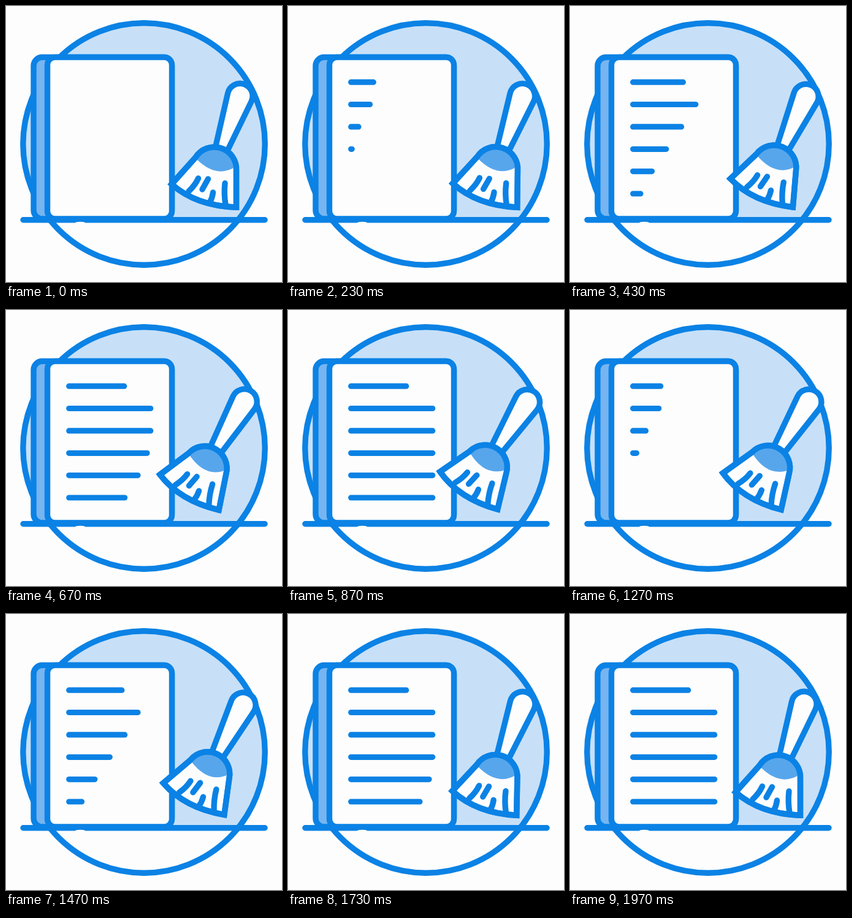
Write an HTML page without scripts that moves like this. It is 450 by 450 pixels and loops after 2.01 s.

```html
<!DOCTYPE html>
<html lang="en">
<head>
<meta charset="utf-8">
<title>Sweeping a document</title>
<style>
  /* Tick counter: 60 ticks of 1/30 s per loop */
  @property --f {
    syntax: "<number>";
    inherits: true;
    initial-value: 0;
  }
  @keyframes tick {
    0% { --f: 0; animation-timing-function: steps(60, jump-none); }
    99.502%, 100% { --f: 59; }
  }
  html, body {
    margin: 0;
    width: 100%;
    height: 100%;
    overflow: hidden;
    background: #fdfdfd;
  }
  svg {
    display: block;
    width: 100vw;
    height: 100vh;
    fill: none;
    stroke: #0b82e5;
    stroke-width: 9.4;
    stroke-linecap: round;
    animation: tick 2010ms linear -3.5ms infinite;
  }
  .sky { fill: #c7e0f8; stroke: none; }
  .paper { fill: #fdfdfd; }
  .spine { fill: #77b5f1; }
  .cap { fill: #57a6ec; stroke: none; }

  /* Text rows are written twice per loop, each two ticks after the last */
  .rows line {
    --p: calc(var(--f) - 30 * clamp(0, var(--f) - 29, 1));
    --x: clamp(0, (var(--p) - 2 * var(--k)) / 16, 1);
    --e: calc(var(--x) * var(--x) * (3 - 2 * var(--x)));
    stroke-dasharray: var(--len) 400px;
    stroke-dashoffset: calc(var(--len) * (1 - var(--e)));
    stroke-width: min(9.2px, calc(var(--x) * 1000px));
    --len: 133px;
  }
  .rows line:first-child { --len: 90px; }

  /* Broom swings out and back once per loop, strongly eased */
  .broom {
    --x: calc(min(var(--f), 60 - var(--f)) / 30);
    --s: calc(var(--x) * var(--x) * (3 - 2 * var(--x)));
    --e: calc(var(--s) * var(--s) * (3 - 2 * var(--s)));
    transform-origin: 372px 184px;
    transform: rotate(calc(13.6deg * var(--e)));
  }
</style>
</head>
<body>
<svg viewBox="0 0 450 450">
  <clipPath id="above"><rect width="450" height="349"/></clipPath>
  <circle class="sky" cx="225" cy="225" r="197.2" clip-path="url(#above)"/>
  <circle cx="225" cy="225" r="197.2"/>
  <path d="M28 348.8H422"/>

  <rect class="spine" x="45" y="83.5" width="225.5" height="263.5" rx="14"/>
  <rect class="paper" x="67.5" y="83.5" width="203" height="263.5" rx="12.5"/>
  <ellipse class="paper" cx="121" cy="353.5" rx="8" ry="1.8" stroke="none"/>

  <g class="rows">
    <line x1="102.7" y1="124.2" x2="192.7" y2="124.2" style="--k:0"/>
    <line x1="102.7" y1="160.5" x2="235.7" y2="160.5" style="--k:1"/>
    <line x1="102.7" y1="196.9" x2="235.7" y2="196.9" style="--k:2"/>
    <line x1="102.7" y1="233.3" x2="235.7" y2="233.3" style="--k:3"/>
    <line x1="102.7" y1="269.6" x2="235.7" y2="269.6" style="--k:4"/>
    <line x1="102.7" y1="306" x2="235.7" y2="306" style="--k:5"/>
  </g>

  <g class="broom">
    <path class="paper" d="M342 228L361.6 142.2A20.5 20.5 0 1 1 400 155.8L360.5 237"/>
    <path class="paper" d="M270 290.5L309 247A36 36 0 0 1 375.5 268V328.2Q310 326 270 290.5Z"/>
    <path class="cap" d="M310 249L309 247A36 36 0 0 1 375.5 261Q344 283 310 249Z"/>
    <path d="M270 290.5L309 247A36 36 0 0 1 375.5 268V328.2Q310 326 270 290.5Z"/>
    <path d="M313.5 281Q308.5 292 298 302M329.5 282L320 299M337.5 304Q336.5 313 332 321M357 289Q355 306 358 324"/>
  </g>
</svg>
</body>
</html>
```
